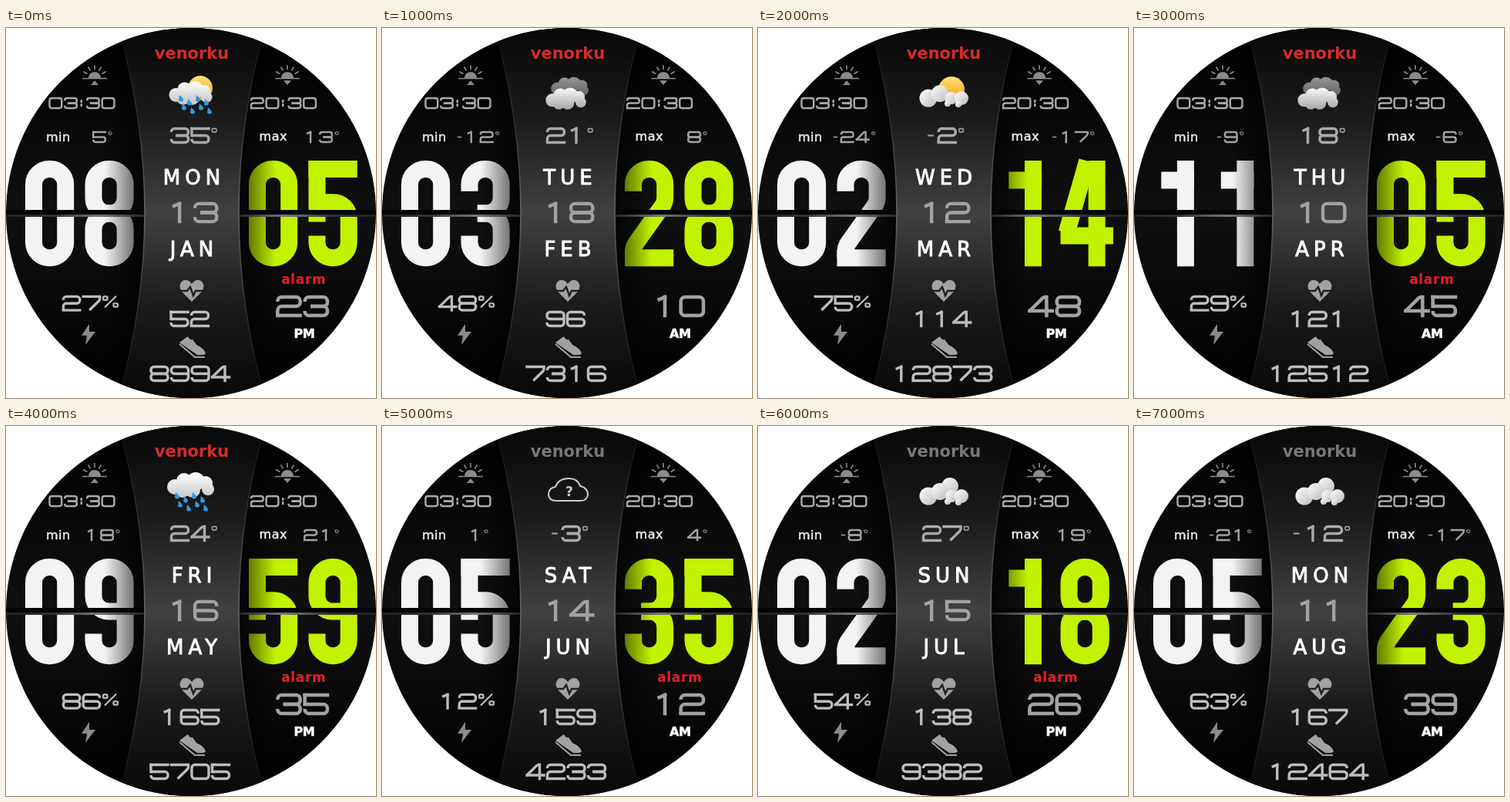
An HTML page with a canvas that plays this animation: 480 px wide and 480 px high, repeating every 8000 ms.

```html
<!DOCTYPE html>
<html lang="en">
<head>
<meta charset="utf-8">
<title>Watch face</title>
<style>
html, body { margin: 0; height: 100%; overflow: hidden; background: #fff; }
canvas { display: block; }
</style>
</head>
<body>
<canvas id="face" width="480" height="480"></canvas>
<script>
const ctx = document.getElementById('face').getContext('2d');
const STEP = 1000;

// hour minute day date month temp min max battery heart steps alarm half alarmOn linked weather
const states = `08 05 MON 13 JAN 35 5 13 27 52 8994 23 PM 1 1 sunRain
03 28 TUE 18 FEB 21 -12 8 48 96 7316 10 AM 0 1 overcast
02 14 WED 12 MAR -2 -24 -17 75 114 12873 48 PM 0 1 sunny
11 05 THU 10 APR 18 -9 -6 29 121 12512 45 AM 1 1 overcast
09 59 FRI 16 MAY 24 18 21 86 165 5705 35 PM 1 1 rain
05 35 SAT 14 JUN -3 1 4 12 159 4233 12 AM 1 0 unknown
02 18 SUN 15 JUL 27 -8 19 54 138 9382 26 PM 1 0 cloudy
05 23 MON 11 AUG -12 -21 -17 63 167 12464 39 AM 0 0 cloudy`
  .split('\n').map(row => row.split(' '));

// Each stroke is a chain of "xy" points on an 8 by 8 grid; corners get rounded.
const wide = {
  0: '05 00 80 88 08 04', 1: '21 40,40 48', 2: '02 00 80 84 04 08,08 88',
  3: '02 00 80 84 24,24 84 88 08 06', 4: '68 60,60 50 06,06 86',
  5: '80 00,00 04,04 84 88 08 06', 6: '82 80 00 08 88 84 04', 7: '00 80,80 82 38',
  8: '34 84 88 08 04 44,34 84 80 00 04 44', 9: '06 08 88 80 00 04 84',
  '-': '04 24', ':': '12 13,15 16', '°': '01 00 20 22 02 00',
  '%': '01 00 20 22 02 00,55 54 74 76 56 54,60 16'
};
const tall = {
  ...wide, 1: '21 61,60 68', 2: '02 00 80 83 07 08,08 88',
  4: '40 05,06 96,70 78', 5: '80 00,00 04,23 83 88 08 06'
};
const advances = { '-': 13, ':': 13, '°': 9, '%': 22 };
const thin = { '-': 2.2, '°': 1.4, '%': 2.3 };

function strokeGlyph(strokes, x, y, kx, ky, r) {
  for (const chain of strokes.split(',')) {
    const pts = chain.split(' ').map(p => [x + p[0] * kx, y + p[1] * ky]);
    ctx.lineCap = pts.length > 2 ? 'butt' : 'square';
    ctx.beginPath();
    ctx.moveTo(...pts[0]);
    for (let i = 1; i < pts.length - 1; i++) ctx.arcTo(...pts[i], ...pts[i + 1], r);
    ctx.lineTo(...pts.at(-1));
    ctx.stroke();
  }
  ctx.lineCap = 'butt';
}

function number(text, cx, y, height, color, pitch = 26.5) {
  const advance = c => advances[c] || pitch;
  const total = [...text].reduce((sum, c) => sum + advance(c), 0);
  ctx.save();
  ctx.translate(cx, y);
  ctx.scale(height / 21, height / 21);
  ctx.strokeStyle = color;
  let x = -total / 2 + 2;
  for (const c of text) {
    ctx.lineWidth = thin[c] || 3.4;
    strokeGlyph(wide[c], x, 1.5, 2.75, 2.25, thin[c] ? 1 : 4);
    x += advance(c);
  }
  ctx.restore();
}

function bigNumber(text, x, color) {
  ctx.strokeStyle = color;
  ctx.lineWidth = 22;
  [...text].forEach((c, i) => strokeGlyph(tall[c], x + i * 77.5, 183, 5.15, 14.4, 20));
}

function label(text, cx, baseline, font, color, spacing = 0, outline = 0) {
  ctx.font = font + ' "DejaVu Sans", sans-serif';
  ctx.letterSpacing = spacing + 'px';
  ctx.textAlign = 'center';
  ctx.fillStyle = ctx.strokeStyle = color;
  ctx.fillText(text, cx + spacing / 2, baseline);
  if (outline) {
    ctx.lineWidth = outline;
    ctx.strokeText(text, cx + spacing / 2, baseline);
  }
}

function fade(x0, y0, x1, y1, ...colors) {
  const g = ctx.createLinearGradient(x0, y0, x1, y1);
  colors.forEach((c, i) => g.addColorStop(i / (colors.length - 1), c));
  return g;
}

function rect(x, y, w, h, fill) {
  ctx.fillStyle = fill;
  ctx.fillRect(x, y, w, h);
}

function fillPath(d, color) {
  ctx.fillStyle = color;
  ctx.fill(new Path2D(d));
}

function strokePath(d, color, width) {
  ctx.strokeStyle = color;
  ctx.lineWidth = width;
  ctx.stroke(new Path2D(d));
}

function disc(x, y, r, fill) {
  ctx.fillStyle = fill;
  ctx.beginPath();
  ctx.arc(x, y, r, 0, 7);
  ctx.fill();
}

const cloudShape = [[-21, 2, 10], [-9, -6, 10], [6, -5, 12], [19, -3, 9], [22, 5, 8], [2, 6, 10], [-11, 7, 9]];

function cloud(x, y, light, dark, size = 1) {
  const fill = fade(0, y - 16, 0, y + 18, light, dark);
  for (const [dx, dy, r] of cloudShape) disc(x + dx * size, y + dy * size, r * size, fill);
}

function sun(x, y, r) {
  disc(x, y, r, fade(x, y - r, x, y + r, '#ffe27a', '#f39a0b'));
}

function rain(x, y) {
  for (let i = 0; i < 8; i++) {
    ctx.save();
    ctx.translate(x + i % 4 * 11 + (i > 3 ? 4 : 0), y + i % 2 * 5 + (i > 3 ? 11 : 0));
    fillPath('M-2 -4Q4 1 3 3Q0 6 -3 3Z', '#2d9be0');
    ctx.restore();
  }
}

function puffs() {
  for (const [x, y, r] of [[221, 91, 11.5], [236, 85, 11], [251, 91, 8], [264, 91, 9], [246, 98, 4], [260, 99, 4]])
    disc(x, y, r, fade(x - r, y - r, x + r, y + r, '#fff', '#bbb'));
}

const weather = {
  sunRain() { sun(252, 78, 16); cloud(240, 85, '#fff', '#bcbcbc', .92); rain(227, 91); },
  rain() { cloud(240, 77, '#fff', '#c4c4c4'); rain(222, 90); },
  sunny() { sun(251, 80, 17); puffs(); },
  cloudy() { disc(249, 78, 11, fade(238, 67, 260, 89, '#fff', '#bbb')); puffs(); },
  overcast() {
    cloud(244, 77, '#9a9a9a', '#555', .8);
    cloud(239, 92, '#fff', '#999', .86);
  },
  unknown() {
    strokePath('M226 97Q216 97 216 88Q217 80 225 79Q229 68 242 68Q254 68 257 78Q267 80 267 89Q266 97 258 97Z', '#ccc', 2);
    label('?', 243, 91, 'bold 17px', '#ccc');
  }
};

function horizon(x, tip) {
  const gray = '#8b8b8b';
  ctx.fillStyle = gray;
  ctx.beginPath();
  ctx.arc(x, 65, 8, Math.PI, 0);
  ctx.fill();
  for (let i = 1; i < 6; i++) {
    const a = Math.PI * (1 + i / 6), c = Math.cos(a), s = Math.sin(a);
    strokePath(`M${x + c * 11} ${65 + s * 11}L${x + c * 17} ${65 + s * 17}`, gray, 1.6);
  }
  strokePath(`M${x - 16} 65.5h32`, gray, 1.6);
  fillPath(`M${x} ${tip}L${x - 5} ${142 - tip}h10Z`, gray);
}

const leftEdge = 'M146 0Q214 240 146 480', rightEdge = 'M336 480Q268 240 336 0';

function background(hour, minute) {
  rect(0, 0, 480, 480, fade(0, 0, 0, 480, '#000', '#080808', '#101010', '#080808', '#000'));
  bigNumber(hour, 36, '#f3f3f3');
  bigNumber(minute, 326, '#c2f200');
  rect(128, 0, 60, 480, fade(128, 0, 182, 0, 'rgba(0,0,0,0)', 'rgba(0,0,0,.75)'));
  rect(300, 0, 50, 480, fade(300, 0, 350, 0, 'rgba(0,0,0,.7)', 'rgba(0,0,0,0)'));
  rect(0, 236, 480, 7, '#050505');
  rect(0, 242, 180, 3, fade(0, 0, 180, 0, '#222', '#333', '#777', '#222'));
  rect(302, 242, 178, 3, fade(302, 0, 480, 0, '#222', '#777', '#333', '#222'));
  fillPath(leftEdge + rightEdge.replace('M', 'L') + 'Z',
    fade(0, 0, 0, 480, '#080808', '#1b1b1b', '#414141', '#1b1b1b', '#080808'));
  const rim = fade(0, 0, 0, 480, '#0a0a0a', '#333', '#666', '#333', '#0a0a0a');
  strokePath(leftEdge, rim, 1.5);
  strokePath(rightEdge, rim, 1.5);
}

function draw(state) {
  const [hour, minute, day, date, month, temp, low, high, battery,
    heart, steps, alarm, half, alarmOn, linked, sky] = state;
  const light = '#bdbdbd', gray = '#a2a2a2';

  ctx.clearRect(0, 0, 480, 480);
  ctx.save();
  ctx.beginPath();
  ctx.arc(240, 240, 240, 0, 7);
  ctx.clip();
  background(hour, minute);

  label('venorku', 241, 40, 'bold 21px', linked > 0 ? '#d52b2b' : '#777');
  weather[sky]();
  number(temp + '°', 243.5, 129, 21, '#aaa');
  label(day, 241, 203, '26px', '#fff', 6, 1);
  number(date, 242.5, 226, 27, gray);
  label(month, 241, 296, '26px', '#fff', 6, 1);

  fillPath('M241 355L229 343Q222 334 229 328Q236 325 241 332Q246 325 253 328Q260 334 253 343Z', gray);
  strokePath('M225 341H235L239 336L243 347L246 341H258', '#222', 2.5);
  number(heart, 238.5, 367, 21, light);
  fillPath('M225 408L236 400Q238 405 242 404L247 411Q258 416 259 423Q254 425 248 424Z', gray);
  strokePath('M225 410L245 427H258', gray, 2);
  number(steps, 239, 438, 21, light);

  horizon(115, 68);
  horizon(365, 74);
  number('03:30', 99, 90, 15, '#aaa', 27.5);
  number('20:30', 360.5, 90, 15, '#aaa', 27.5);
  label('min', 67.5, 147, '16px', '#eee', .5, .5);
  label('max', 346.5, 146, '16px', '#eee', .5, .5);
  number(low + '°', 125, 134, 15, gray, 28);
  number(high + '°', 409, 134, 15, gray, 28);

  number(battery + '%', 109, 347, 20.5, light);
  fillPath('M108 384L98 399H105L103 411L116 394H108Z', '#8b8b8b');
  if (alarmOn > 0) label('alarm', 386, 332, 'bold 17px', '#ea1c24', .7);
  number(alarm, 385, 347, 28, gray);
  label(half, 387, 402, 'bold 16px', '#fff', -.5, .6);
  ctx.restore();
}

function tick() {
  draw(states[Math.floor(performance.now() / STEP) % states.length]);
  requestAnimationFrame(tick);
}
tick();
</script>
</body>
</html>
```
